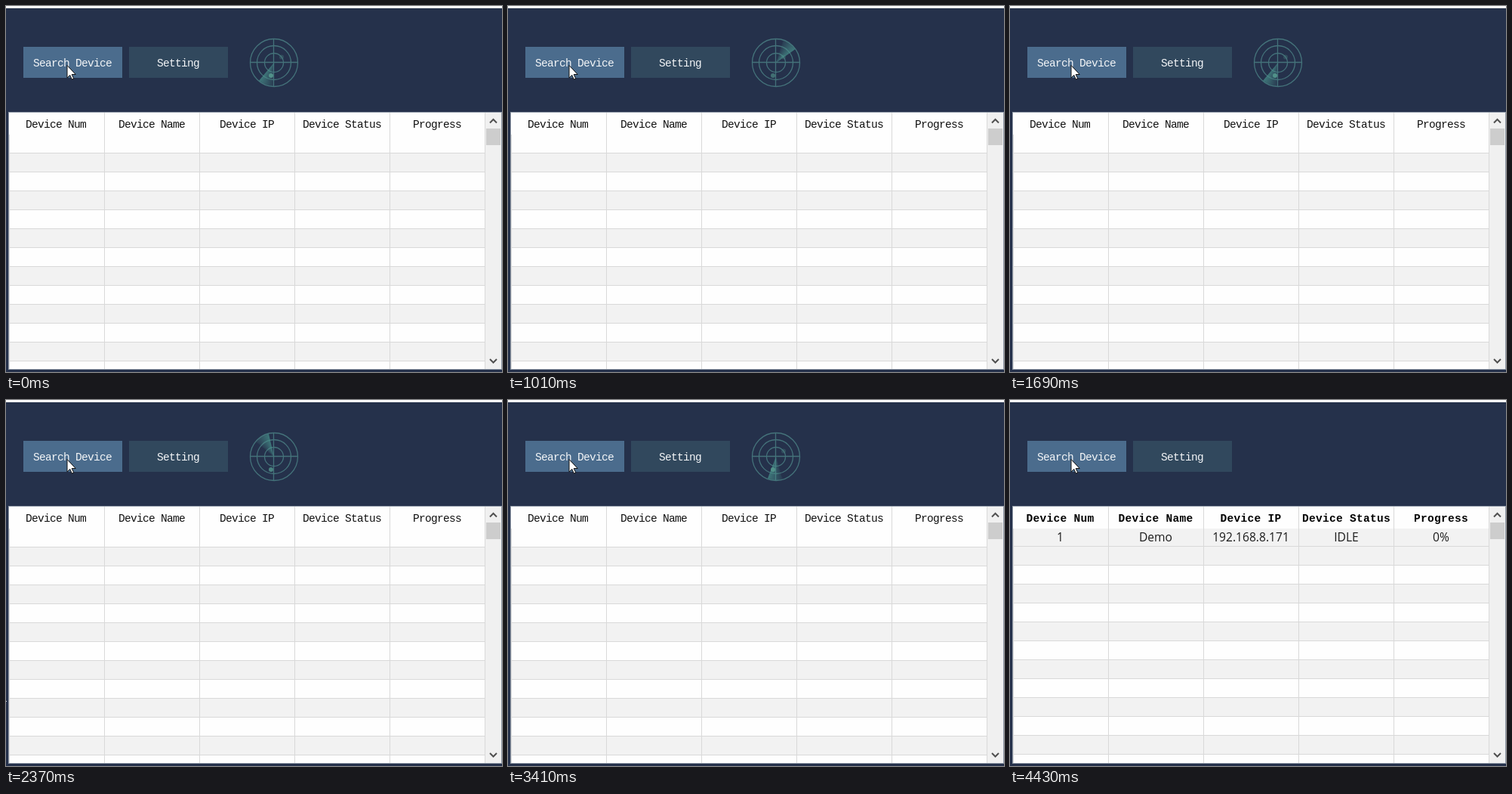
Animation of 657 by 484 pixels, one loop 5130 ms. Source, as an HTML page:

```html
<!DOCTYPE html>
<html lang="en">
<head>
<meta charset="utf-8">
<title>Device search</title>
<style>
html, body { margin: 0; width: 100%; height: 100%; overflow: hidden; background: #25314b; }
svg { position: absolute; left: 0; top: 0; display: block; }
text { white-space: pre; }
.mono { font: 14.5px "Liberation Mono", monospace; letter-spacing: -.7px; }
.bold { font-weight: 700; letter-spacing: .3px; }
.cell { font: 15.6px "Open Sans", "Noto Sans", sans-serif; text-anchor: middle; fill: #1c1c1c; }
.crisp { shape-rendering: crispEdges; }

.wait, .done, .speck, .sweep, .near, .far { animation: 5130ms step-end infinite; }
.wait { animation-name: wait; }
.done { animation-name: done; }
.speck { animation-name: speck; }
.near { animation-name: near; }
.far { animation-name: far; }
#radar { position: absolute; left: 324px; top: 44px; width: 62px; height: 62px; }
.sweep {
  width: 100%; height: 100%; border-radius: 50%;
  background: conic-gradient(from -37deg, rgba(72,146,140,.12), rgba(72,146,140,.72) 37deg, transparent 37.5deg);
  animation-name: sweep;
}

@keyframes wait { 0% { visibility: visible } 86.35%, 100% { visibility: hidden } }
@keyframes done { 0% { visibility: hidden } 86.35%, 100% { visibility: visible } }
@keyframes speck { 0% { opacity: 0 } 46.19% { opacity: 1 } 52.82%, 100% { opacity: 0 } }
/* Sweep heading, clockwise from the top */
@keyframes sweep {
  0% { transform: rotate(220deg) }
  6.62% { transform: rotate(290deg) }
  13.06% { transform: rotate(347deg) }
  19.68% { transform: rotate(55deg) }
  26.31% { transform: rotate(146deg) }
  32.94% { transform: rotate(220deg) }
  39.57% { transform: rotate(290deg) }
  46.19% { transform: rotate(347deg) }
  52.82% { transform: rotate(55deg) }
  59.45% { transform: rotate(146deg) }
  66.47% { transform: rotate(201deg) }
  73.09% { transform: rotate(253deg) }
  79.72%, 100% { transform: rotate(273deg) }
}
@keyframes near {
  0%, 32.94%, 66.47%, 100% { opacity: 1 }
  6.62%, 39.57%, 73.09% { opacity: .85 }
  19.68%, 52.82% { opacity: .65 }
  26.31%, 59.45% { opacity: .4 }
}
@keyframes far {
  0%, 19.68%, 52.82%, 100% { opacity: .3 }
  6.62%, 39.57% { opacity: 0 }
}
</style>
</head>
<body>
<svg width="657" height="484" viewBox="0 0 657 484">
  <defs>
    <pattern id="rows" y="145" width="657" height="50" patternUnits="userSpaceOnUse">
      <path fill="#fefefe" d="M0 0H657V50H0z"/>
      <path fill="#f2f2f2" d="M0 0H657V24H0z"/>
      <path fill="#d9d9d9" d="M0 24H657V25H0zM0 49H657V50H0z"/>
    </pattern>
    <clipPath id="body"><path d="M4 170H635V480H4z"/></clipPath>
  </defs>

  <g class="crisp">
    <path fill="#25314b" d="M0 0H657V484H0z"/>
    <path fill="#fefefe" d="M0 0H657V3H0z"/>
    <path fill="#4b6c8d" d="M23 54H154V95H23z"/>
    <path fill="#31485d" d="M163 54H294V95H163z"/>
    <path class="speck" fill="#e8eaee" d="M0 398H1V399H0z"/>
  </g>
  <g class="mono" fill="#f4f6f8">
    <text x="36" y="80">Search Device</text>
    <text x="200" y="80">Setting</text>
  </g>
  <path d="M81 78.500V95l3.800-3.600 2.500 5.700 2.400-1-2.500-5.600h5z" fill="#fff" stroke="#111" stroke-width="1"/>

  <g class="wait" fill="none" stroke="#44727a" stroke-width="1.300">
    <circle cx="355" cy="75" r="31.500"/>
    <circle cx="355" cy="75" r="22.500"/>
    <circle cx="355" cy="75" r="12.500"/>
    <path d="M323 74.500H387M354.500 43V107"/>
  </g>

  <g class="crisp">
    <path fill="#8d97a5" d="M3 140H657V481H3z"/>
    <path fill="#fefefe" d="M4 141H656V480H4z"/>
    <g clip-path="url(#body)">
      <path class="wait" fill="url(#rows)" d="M4 160H635V490H4z"/>
      <g class="done">
        <path fill="url(#rows)" transform="translate(0 -1)" d="M4 160H635V490H4z"/>
        <path fill="#f2f2f2" d="M4 170H635V193H4z"/>
      </g>
    </g>
    <path stroke="#d9d9d9" d="M4.500 170V480M130.500 141V480M256.500 141V480M382.500 141V480M508.500 141V480M634.500 141V480"/>
    <path fill="#f0f0f0" d="M635 141H656V480H635z"/>
    <path fill="#cdcdcd" d="M636 162H655V184H636z"/>
  </g>
  <path d="M641 154.500l4.500-4.500 4.500 4.500M641 467l4.500 4.500 4.500-4.500" fill="none" stroke="#505050" stroke-width="2"/>

  <g class="mono wait" fill="#111">
    <text x="26" y="161">Device Num</text>
    <text x="149" y="161">Device Name</text>
    <text x="283" y="161">Device IP</text>
    <text x="393" y="161">Device Status</text>
    <text x="539" y="161">Progress</text>
  </g>
  <g class="done">
    <g class="mono bold" fill="#000">
      <text x="21.500" y="161">Device Num</text>
      <text x="143.500" y="161">Device Name</text>
      <text x="278.500" y="161">Device IP</text>
      <text x="387" y="161">Device Status</text>
      <text x="535" y="161">Progress</text>
    </g>
    <g class="cell">
      <text x="66.500" y="187">1</text>
      <text x="193" y="187">Demo</text>
      <text x="319" y="187">192.168.8.171</text>
      <text x="445.500" y="187">IDLE</text>
      <text x="571" y="187">0%</text>
    </g>
  </g>
</svg>
<div id="radar" class="wait">
  <div class="sweep"></div>
  <svg width="62" height="62" viewBox="324 44 62 62" fill="#519189">
    <circle class="near" cx="351" cy="92" r="3"/>
    <circle class="far" cx="365" cy="67.500" r="3"/>
  </svg>
</div>
</body>
</html>
```
